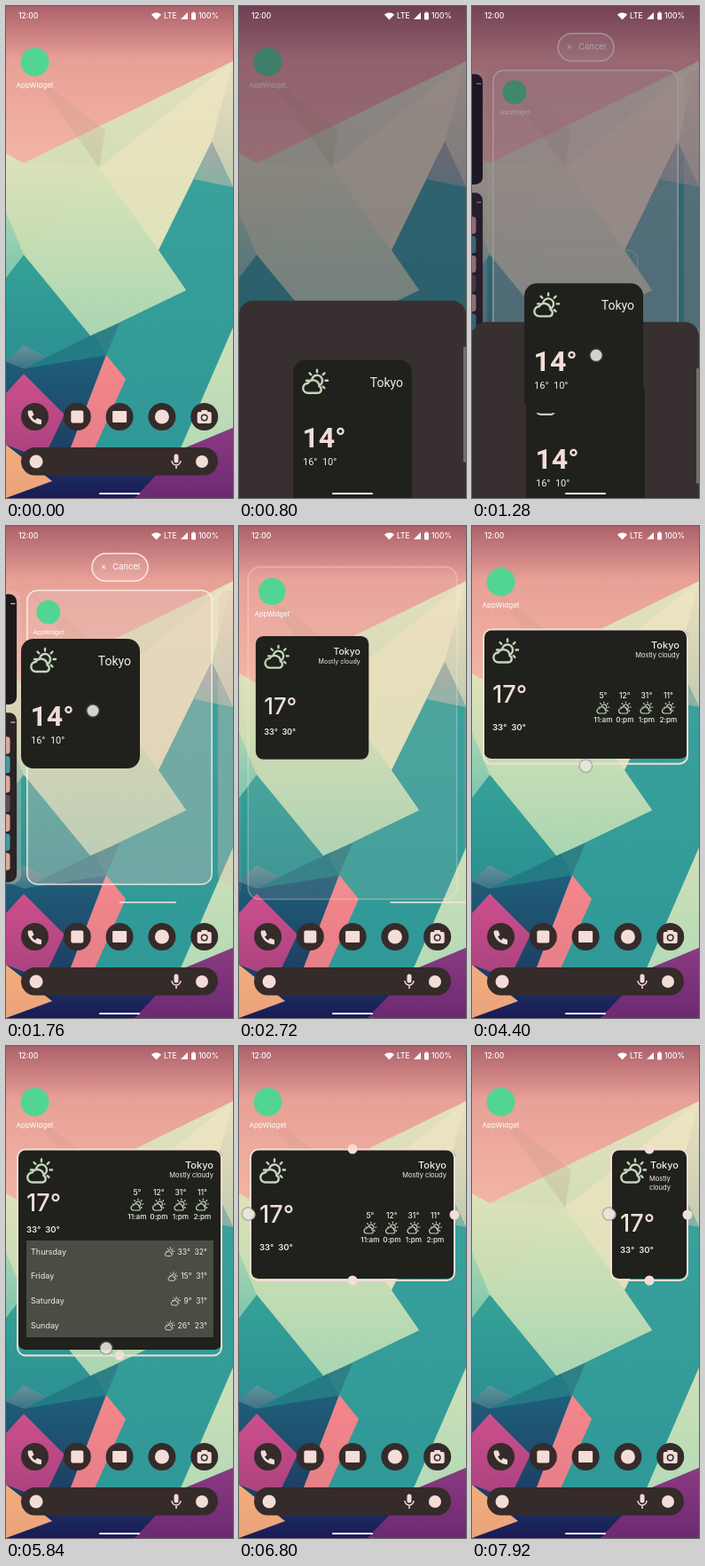
An HTML page with a canvas for the animation above (8 s loop, 256 by 554 pixels).

```html
<!DOCTYPE html>
<html lang="en">
<head>
<meta charset="utf-8">
<title>Resizable weather widget</title>
<style>
html, body { margin: 0; width: 100%; height: 100%; overflow: hidden; background: #1d3f66; }
canvas { display: block; width: 256px; height: 554px; }
</style>
</head>
<body>
<canvas id="stage"></canvas>
<script>
const LOOP = 8000, STEP = 80;
const canvas = document.getElementById('stage');
const c = canvas.getContext('2d');
const dpr = window.devicePixelRatio || 1;
canvas.width = 256 * dpr;
canvas.height = 554 * dpr;

const INK = '#f4ddd7', CARD = '#20211c', GREEN = '#c3d6bb', DARK = '#352b2a';

const mix = (a, b, k) => a + (b - a) * k;
const ramp = (t, a, b) => {
  const k = Math.min(1, Math.max(0, (t - a) / (b - a)));
  return k * k * (3 - 2 * k);
};
const snap = (v, base, pitch) => base + pitch * Math.round((v - base) / pitch);

function text(s, x, y, size, { align = 'left', weight = 400, color = '#f0ece4', font = 'Inter' } = {}) {
  c.font = `${weight} ${size}px ${font}, sans-serif`;
  c.textAlign = align;
  c.textBaseline = 'middle';
  c.fillStyle = color;
  c.fillText(s, x, y);
}
function box(x, y, w, h, r, fill, stroke, line = 1.5) {
  c.beginPath();
  c.roundRect(x, y, w, h, r);
  if (fill) { c.fillStyle = fill; c.fill(); }
  if (stroke) { c.strokeStyle = stroke; c.lineWidth = line; c.stroke(); }
}
function disc(x, y, r, fill) {
  c.beginPath();
  c.arc(x, y, r, 0, 7);
  c.fillStyle = fill;
  c.fill();
}
function shade(top, bottom, y0, y1) {
  const g = c.createLinearGradient(0, y0, 0, y1);
  g.addColorStop(0, top);
  g.addColorStop(1, bottom);
  return g;
}
function at(x, y, scale, draw) {
  c.save();
  c.translate(x, y);
  c.scale(scale, scale);
  draw();
  c.restore();
}

// corners shared by the wallpaper facets
const corner = {
  a: [0, 0], b: [256, 0], c: [256, 62], d: [20, 177], e: [0, 166], f: [105, 182], g: [172, 275],
  h: [203, 320], i: [20, 280], j: [113, 393], k: [20, 408], l: [0, 306], m: [232, 153], n: [256, 204],
  o: [256, 554], p: [0, 554], q: [135, 420], r: [97, 505], s: [70, 505], t: [20, 414], u: [66, 460],
  v: [42, 510], w: [0, 494], x: [0, 400], y: [256, 362], z: [196, 500],
  A: [0, 232], B: [26, 72], C: [112, 140], D: [0, 436], E: [212, 195], G: [100, 369], H: [128, 357],
  I: [20, 382], J: [45, 395], K: [256, 475], L: [145, 554], N: [52, 535]
};
function facet(path, top, bottom = top) {
  const pts = [...path].map(key => corner[key]);
  const ys = pts.map(p => p[1]);
  c.fillStyle = shade(top, bottom, Math.min(...ys), Math.max(...ys));
  c.beginPath();
  pts.forEach(p => c.lineTo(...p));
  c.fill();
}
function wallpaper() {
  facet('abop', '#e9e2bd', '#a8d6b0');
  facet('edfiA', '#dfe2ba', '#c2dbb0');
  facet('Ail', '#a9d5b2', '#7fc6ad');
  facet('cfgm', '#ede3c0', '#dfe2ba');
  facet('cmn', '#ece0c0', '#c3cbb0');
  facet('abcde', '#e39590', '#f2b5a4');
  facet('BfC', 'rgba(190,140,125,.12)', 'rgba(180,170,120,.3)');
  facet('mnopkhg', '#3ba29b', '#2d9797');
  facet('mEn', '#a9aba4', '#84b2a6');
  facet('fhki', '#dbe3b8', '#9fd3b0');
  facet('ijkxl', '#35a297', '#2b8f92');
  facet('GHj', '#2f8086');
  facet('xkjsp', '#1f5f7a', '#1c3059');
  facet('kGj', '#247a85');
  facet('xIJk', '#61969a', '#3f7386');
  facet('yzK', '#cfe0b8', '#b4dab6');
  facet('srop', '#1d3a66', '#1a1a55');
  facet('jqrs', '#f4868b', '#e67f88');
  facet('tuvwD', '#cd4f8c', '#a8427f');
  facet('wNp', '#f3ad7c', '#eaa37c');
  facet('KzLo', '#8a3a80', '#6c2a72');
  c.fillStyle = shade('rgba(90,20,50,.4)', 'rgba(90,20,50,0)', 0, 60);
  c.fillRect(0, 0, 256, 60);
}

const cloud = new Path2D('M-8 12a5.500 5.500 0 0 1-.5-11 7 7 0 0 1 13 3.500a4 4 0 0 1-1 7.500z');
function weather(x, y, scale, color = GREEN) {
  at(x, y, scale, () => {
    c.strokeStyle = color;
    c.lineWidth = 2.4;
    c.lineCap = 'round';
    c.stroke(cloud);
    c.beginPath();
    c.arc(2, -2, 6, -2.9, .9);
    for (let i = -4; i < 2; i++) {
      const dx = Math.cos(i * Math.PI / 4), dy = Math.sin(i * Math.PI / 4);
      c.moveTo(2 + dx * 9.5, -2 + dy * 9.5);
      c.lineTo(2 + dx * 12, -2 + dy * 12);
    }
    c.stroke();
    c.lineCap = 'butt';
  });
}

function statusBar() {
  const o = { weight: 500, color: '#fff' };
  text('12:00', 14, 11, 8.5, o);
  text('LTE', 178, 11, 8.5, o);
  text('100%', 217, 11, 8.5, o);
  c.fillStyle = '#fff';
  c.beginPath();
  c.moveTo(169.5, 15.5);
  c.arc(169.5, 15.5, 8, -2.35, -.79);
  c.moveTo(197, 15);
  c.lineTo(205, 15);
  c.lineTo(205, 7);
  c.fill();
  box(209, 7.5, 5, 8, 1, '#fff');
  c.fillRect(210.5, 6.5, 2, 1);
}

const phone = new Path2D('M-7-7h4l2 5-2.500 2a11 11 0 0 0 4 4l2-2.500 5 2v4a1.500 1.500 0 0 1-2 1A15 15 0 0 1-8-5.500z');
const glyphs = [
  () => { c.fillStyle = INK; c.fill(phone); },
  () => box(-7, -7, 14, 14, 2, INK),
  () => box(-8, -6.5, 16, 13, 1, INK),
  () => disc(0, 0, 8, INK),
  () => {
    box(-8, -5.5, 16, 13, 2, INK);
    box(-3.5, -7.5, 7, 3, 1, INK);
    disc(0, 1, 4, DARK);
    disc(0, 1, 2.5, INK);
  }
];
function dock() {
  glyphs.forEach((glyph, i) => at(32.5 + i * 47.8, 462.5, 1, () => {
    disc(0, 0, 15.5, DARK);
    glyph();
  }));
  box(17, 497, 222, 31.5, 15.7, DARK);
  disc(34, 513, 7.5, INK);
  disc(221, 513, 7, INK);
  box(189.5, 504.5, 5, 10, 2.5, INK);
  c.strokeStyle = INK;
  c.lineWidth = 1.5;
  c.beginPath();
  c.arc(192, 512, 5, 0, Math.PI);
  c.moveTo(192, 517);
  c.lineTo(192, 521);
  c.stroke();
}

function preview(x, y, scale) {
  const o = { font: 'Roboto' };
  at(x, y, scale, () => {
    box(0, 0, 134, 146, 14, CARD);
    weather(25, 25, 1);
    text('Tokyo', 124, 26, 14, { ...o, align: 'right' });
    text('14°', 10.5, 89, 32, { ...o, weight: 700, color: INK });
    text('16°  10°', 11, 115, 11, o);
  });
}

const hours = [['5°', '11:am'], ['12°', '0:pm'], ['31°', '1:pm'], ['11°', '2:pm']];
const days = [['Thursday', '33°  32°'], ['Friday', '15°  31°'], ['Saturday', '9°  31°'], ['Sunday', '26°  23°']];

function widget(x, y, w, h) {
  const right = { align: 'right' }, mid = { align: 'center', weight: 500 };
  const r = x + w - 10, tall = h > 200, wide = w > 170, slim = w < 110;
  box(x, y, w, h, 9, CARD);
  weather(x + 25, y + 25.5, 1);
  text('Tokyo', r, y + 18.5, 11, { ...right, weight: 500 });
  if (slim) {
    text('Mostly', x + 43, y + 34, 7.5);
    text('cloudy', x + 43, y + 43.5, 7.5);
  } else text('Mostly cloudy', r, y + 30, 7.5, right);
  text('17°', x + 10, y + (tall ? 62 : wide ? 75 : 85), 27, { color: INK, weight: 500 });
  text('33°  30°', x + 10, y + (tall ? 91 : wide ? 111 : 114), 9.5, { weight: 600 });

  if (wide) hours.forEach(([deg, hour], i) => {
    const hx = x + w - 96 + i * 24.5, hy = y + (tall ? 49 : 75);
    text(deg, hx, hy, 8.5, mid);
    weather(hx, hy + 14, .5);
    text(hour, hx, hy + 28, 8.2, mid);
  });
  if (tall) {
    box(x + 10, y + 103, w - 20, 109, 0, '#4b4d45');
    days.forEach(([day, deg], i) => {
      const ry = y + 116 + i * 27.7;
      text(day, x + 15, ry, 9);
      text(deg, r - 7, ry, 8.5, right);
      weather(r - 16 - c.measureText(deg).width, ry, .38, '#dcdccf');
    });
  }
}

function leftPage() {
  box(-130, 39, 120, 148, 10, '#1e1a1a');
  box(-130, 198, 120, 227, 10, '#2b2424');
  for (let i = 0; i < 7; i++)
    box(-40, 230 + i * 26, 21, 23, 4, i % 4 === 1 ? '#4a9aa0' : i % 4 === 3 ? '#5c5254' : '#dca99a');
  c.fillStyle = '#cfc4c0';
  c.fillRect(-18, 51, 6, 1.5);
  c.fillRect(-18, 210, 6, 1.5);
}

function page(edit, drawWidget) {
  const k = 1 - .16 * edit;
  at(128 - 128 * k, 44 * edit, k, () => {
    if (edit > 0) {
      c.globalAlpha = edit;
      for (let dx = -256; dx <= 256; dx += 256)
        box(dx + 4, 34, 248, 394, 14, 'rgba(225,190,185,.34)', dx ? '' : 'rgba(255,240,232,.9)', 1.8);
      c.globalAlpha = 1;
      leftPage();
    }
    disc(32.5, 63, 16, '#52d592');
    text('AppWidget', 32.5, 90, 8, { align: 'center', color: '#fff' });
    drawWidget();
  });
}

function editBar(edit, lastPage) {
  c.globalAlpha = Math.max(0, edit * 2 - 1);
  box(97, 31, 63, 31, 15.5, 'rgba(238,205,196,.2)', '#ffe9e0');
  text('✕', 110, 46.5, 8, { align: 'center', color: '#fff', font: 'DejaVu Sans' });
  text('Cancel', 120, 46.5, 9.5, { color: '#fff' });
  c.globalAlpha = 1;
  c.fillStyle = '#f4e8e2';
  const w = 256 / (lastPage ? 3 : 4);
  c.fillRect(2 * w, 423, w, 1.5);
}

function picker(open) {
  const top = 554 - 300 * open;
  c.fillStyle = `rgba(35,20,55,${.6 * open})`;
  c.fillRect(0, 0, 256, 554);
  box(0, top, 256, 320, 16, '#383030');
  box(253, top + 52, 3, 130, 1, '#776e6c');
  box(61, top + 67, 134, 250, 14, CARD);
  preview(61, top + 67, 1);
}

function resizeFrame(L, R, B, active) {
  const cx = (L + R) / 2, cy = (116 + B) / 2;
  box(L, 116.5, R - L, B - 116.5, 9, '', INK, 2);
  const spots = { left: [L, cy], right: [R, cy], top: [cx, 116], bottom: [cx, B] };
  for (const side in spots)
    if (!active || side === active) disc(...spots[side], 5.5, INK);
}

function touch(x, y) {
  disc(x, y, 8, 'rgba(110,110,104,.4)');
  disc(x, y, 6.5, 'rgba(240,236,230,.85)');
}

function draw(t) {
  const during = (a, b) => t >= a && t < b;
  c.setTransform(dpr, 0, 0, dpr, 0, 0);

  const edit = ramp(t, 1120, 1260) - ramp(t, 2560, 2816);
  const sheet = ramp(t, 640, 880) - ramp(t, 1190, 1420);
  const move = ramp(t, 1210, 1760), drop = ramp(t, 1920, 2100);
  const cardX = mix(mix(61, 17, move), 31.4, drop);
  const cardY = mix(mix(321, 127, move), 141.4, drop);

  // frame edges follow the finger, the widget snaps to grid cells
  const L = mix(13, 157, ramp(t, 6960, 7840));
  const R = mix(147, 243, ramp(t, 3350, 3950));
  const pull = ramp(t, 4300, 5100) - ramp(t, 5840, 6600);
  const B = mix(264, 348.5, pull);
  const w = snap(R - L, 86, 48.3), h = snap(B - 118, 146, 80);

  wallpaper();
  dock();
  page(edit, () => { if (t >= 2100) widget(t < 6900 ? 13 : 243 - w, 116, w, h); });
  if (edit > 0) editBar(edit, t >= 2200);
  if (during(1220, 1500)) box(70, 275, 117, 123, 11, '', 'rgba(200,225,195,.7)', 1);
  if (sheet > 0) picker(sheet);
  if (during(1120, 2100)) preview(cardX, cardY, mix(1, .84, drop));

  const active = during(3280, 4000) ? 'right' : during(4240, 6680) ? 'bottom' : during(6880, 7840) ? 'left' : '';
  if (t >= 2960) resizeFrame(L, R, B, active);

  if (during(240, 640)) touch(32, 63);
  if (during(960, 1960)) touch(cardX + 81, cardY + 81);
  if (during(3200, 4000)) touch(R, 190);
  if (during(4240, 6680)) touch(mix(129, 113, pull), mix(267, 340, pull));
  if (t >= 6800) touch(L - 2.5, 189);

  statusBar();
  box(105, 548, 46, 2, 1, '#fff');
}

function frame(now) {
  draw(Math.floor(now % LOOP / STEP) * STEP);
  requestAnimationFrame(frame);
}
requestAnimationFrame(frame);
</script>
</body>
</html>
```
